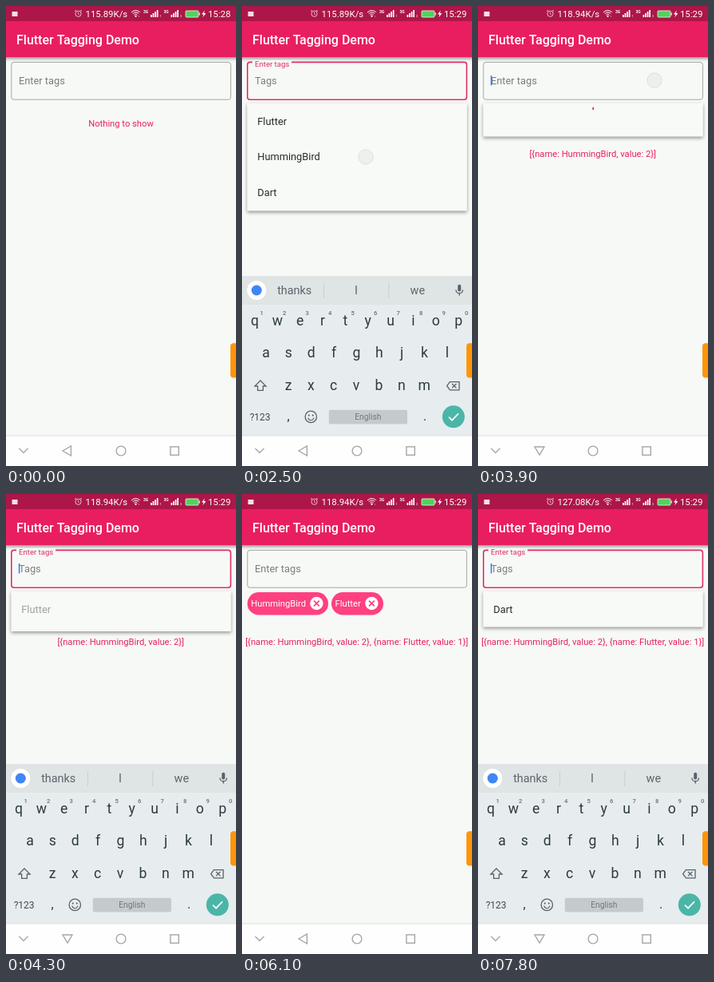
Write an HTML page with a canvas that moves like this. It is 288 by 576 pixels and loops after 8000 ms.

```html
<!DOCTYPE html>
<html lang="en">
<head>
<meta charset="utf-8">
<title>Tagging demo</title>
<style>
html, body { margin: 0; width: 100%; height: 100%; overflow: hidden; background: #f7f9f8; }
canvas { display: block; width: 288px; height: 576px; }
</style>
</head>
<body>
<canvas id="stage"></canvas>
<script>
const W = 288, H = 576, LOOP = 8000;
const PINK = '#e91e60', BG = '#f7f9f7', KEY = '#2b3b41', NAV = '#a6a6a6';
const canvas = document.getElementById('stage');
const dpr = window.devicePixelRatio || 1;
canvas.width = W * dpr;
canvas.height = H * dpr;
const c = canvas.getContext('2d');

// One run: focus the field, load suggestions, pick one.
const runs = [
  { nav: 750, kb: 900, load: 1180, focus: 1080, list: 1680, grow: 120, spin: 220,
    rows: ['Flutter', 'HummingBird', 'Dart'], back: 2450, hide: 2600, pick: 2750 },
  { nav: 3850, kb: 3950, load: 3850, focus: 3910, list: 4280, grow: 330, spin: 400,
    rows: ['Flutter', 'Dart'], back: 4950, hide: 5110, pick: 5180 },
  { nav: 6850, kb: 6950, load: 6850, focus: 6910, list: 7350, grow: 150, spin: 450,
    rows: ['Dart'], back: 1e5, hide: 1e5, pick: 1e5 }
];
const taps = [
  { x: 221, y: 93, from: 500, to: 700 },
  { x: 155, y: 189, from: 2300, to: 2420 },
  { x: 221, y: 93, from: 3700, to: 3820 },
  { x: 193, y: 143.5, from: 4800, to: 5110 },
  { x: 221, y: 93, from: 6700, to: 6820 }
];

const clamp = v => Math.max(0, Math.min(1, v));
const lerp = (a, b, p) => a + (b - a) * p;
const ramp = (t, start, len) => clamp((t - start) / len);
const smooth = p => p * p * (3 - 2 * p);

function text(s, x, y, size, color, align = 'left', weight = 400) {
  c.font = `${weight} ${size}px Roboto, sans-serif`;
  c.textAlign = align;
  c.fillStyle = color;
  c.fillText(s, x, y);
}
function rect(x, y, w, h, color) {
  c.fillStyle = color;
  c.fillRect(x, y, w, h);
}
function round(x, y, w, h, r) {
  c.beginPath();
  c.roundRect(x, y, w, h, r);
}
function disc(x, y, r, color) {
  c.beginPath();
  c.arc(x, y, r, 0, Math.PI * 2);
  c.fillStyle = color;
  c.fill();
}
function ring(x, y, r, color, width) {
  c.beginPath();
  c.arc(x, y, r, 0, Math.PI * 2);
  stroke(color, width);
}
function stroke(color, width) {
  c.strokeStyle = color;
  c.lineWidth = width;
  c.stroke();
}
// Flat list x0, y0, x1, y1, ...
function poly(pts, closed) {
  c.beginPath();
  for (let i = 0; i < pts.length; i += 2) c.lineTo(pts[i], pts[i + 1]);
  if (closed) c.closePath();
}
function line(pts, color, width, closed) {
  poly(pts, closed);
  stroke(color, width);
}
function shape(pts, color) {
  poly(pts, true);
  c.fillStyle = color;
  c.fill();
}
function shadow(color, blur, dy) {
  c.shadowColor = color;
  c.shadowBlur = blur * dpr;
  c.shadowOffsetY = dy * dpr;
}

function signal(x, sub) {
  text('3G', x, 8.5, 5, '#fff', 'left', 700);
  for (let i = 0; i < 4; i++) rect(x + 9 + i * 2.6, 11 - i * 2, 1.7, 3 + i * 2, '#fff');
  text(sub, x + 20.5, 14, 4, '#fff');
}

function statusBar(t) {
  rect(0, 0, W, 19, '#ad1648');
  rect(7.5, 7, 7, 6, '#f8dfe7');
  ring(90.5, 9.7, 3.6, '#f3cfdb', 0.9);
  line([90.5, 7.6, 90.5, 10, 92, 10.7], '#f3cfdb', 0.8);
  line([86, 6.6, 88, 5.2], '#f3cfdb', 0.9);
  line([95, 6.6, 93, 5.2], '#f3cfdb', 0.9);
  const speed = t < 2700 ? '115.89' : t < 6500 ? '118.94' : '127.08';
  text(speed + 'K/s', 99.5, 14, 11.4, '#fff');
  for (const r of [2.6, 5, 7.4]) {
    c.beginPath();
    c.arc(162.5, 13, r, -Math.PI * 0.77, -Math.PI * 0.23);
    stroke('#fff', 1);
  }
  disc(162.5, 12.8, 1.1, '#fff');
  text('↕', 165.5, 14, 4, '#fff');
  signal(172, '1');
  signal(197.5, '2');
  round(225, 6, 16, 8, 1);
  c.fillStyle = '#4fd35b';
  c.fill();
  stroke('#d9efdc', 0.9);
  rect(241.6, 8.4, 1.3, 3.2, '#e8e8e8');
  shape([248.8, 5.5, 245, 10.6, 247.4, 10.6, 246.4, 14.2, 250.4, 9, 247.9, 9], '#fff');
  text(t < 100 ? '15:28' : '15:29', 281.3, 14, 11.4, '#fff', 'right');
}

function appBar() {
  c.save();
  shadow('rgba(0,0,0,.42)', 4, 1.5);
  rect(-5, 19, W + 10, 45, PINK);
  c.restore();
  text('Flutter Tagging Demo', 13, 48, 16, '#fff', 'left', 500);
}

function cursorOn(t, run) {
  if (!run || t < run.load) return false;
  return !(t >= 1700 && t < 2600) && !(t >= 7550 && t < 7750);
}

function field(t, run, p) {
  round(6.8, 70.4, 274.6, 46.8, 3.2);
  stroke(p > 0.3 ? '#dd2f66' : '#9b9d9b', lerp(0.9, 1.6, p));
  if (p > 0) rect(13, 68, 49 * p, 5, BG);
  text('Enter tags', 16, lerp(98, 76, p), lerp(12.8, 9.6, p), p > 0.3 ? '#dd2f66' : '#7b7c7b');
  c.globalAlpha = p;
  text('Tags', 16, 98, 12.8, '#7d7e7d');
  c.globalAlpha = 1;
  if (cursorOn(t, run)) rect(15.8, 87, 1.6, 12.4, '#3e7df0');
}

function chip(x, w, label) {
  round(x, 123, w, 28.4, 14.2);
  c.fillStyle = '#ff4081';
  c.fill();
  text(label, x + 4.6, 141, 11.2, '#fff');
  const cx = x + w - 14.6, cy = 137;
  disc(cx, cy, 8.2, '#fff');
  line([cx - 3.4, cy - 3.4, cx + 3.4, cy + 3.4], '#ff4081', 1.7);
  line([cx - 3.4, cy + 3.4, cx + 3.4, cy - 3.4], '#ff4081', 1.7);
}

function tags(t) {
  const n = t < runs[0].pick ? 0 : t < runs[1].pick ? 1 : 2;
  if (!n) return text('Nothing to show', 144, 150.6, 11.2, PINK, 'center');
  chip(6.7, 101.3, 'HummingBird');
  if (n > 1) chip(112, 65, 'Flutter');
  const more = n > 1 ? ', {name: Flutter, value: 1}' : '';
  text(`[{name: HummingBird, value: 2}${more}]`, 143.7, 189, 11.2, PINK, 'center');
}

function spinner(age) {
  const p = age / 667;
  const start = -Math.PI / 2 + p * 0.9;
  c.beginPath();
  c.arc(144, 142, 13.6, start - 0.06, start + 0.06 + smooth(clamp(p)) * 4.6);
  stroke('#c7305f', 3.2);
}

function dropdown(t, run) {
  if (!run || t < run.load || t >= run.pick) return;
  const ready = t >= run.list;
  const grow = 1 - (1 - ramp(t, run.list, run.grow)) ** 3;
  const h = ready ? lerp(42, run.rows.length * 45, grow) : 42;
  c.save();
  shadow('rgba(0,0,0,.4)', 4, 2);
  round(6.4, 121.4, 275.4, h, 1);
  c.fillStyle = '#f8faf7';
  c.fill();
  c.restore();
  c.save();
  round(6.4, 121.4, 275.4, h, 1);
  c.clip();
  if (ready) {
    if (t >= 4900 && t < 5180) rect(6, 121, 276, 45, '#eff1ee');
    c.globalAlpha = 0.3 + 0.7 * grow;
    run.rows.forEach((s, i) => text(s, 19.3, 148.5 + i * 44.8, 12.8, '#2a2b2a'));
  } else {
    spinner(Math.min(t - run.load - 40, run.spin));
  }
  c.restore();
}

function letters(s, x, y) {
  [...s].forEach((ch, i) => text(ch, x + i * 28.35, y, 17.6, KEY, 'center'));
}

function keyboard() {
  rect(0, 338, W, 200, '#e7edee');
  rect(0, 338, W, 36, '#dfe4e5');
  disc(18.3, 356, 12, '#fff');
  disc(18.3, 356, 6.5, '#4285f4');
  text('thanks', 65.7, 361.3, 14.4, '#5b676c', 'center');
  text('I', 143, 361.3, 14.4, '#5b676c', 'center');
  text('we', 219.8, 361.3, 14.4, '#5b676c', 'center');
  rect(102, 347, 1, 19, '#c9ced0');
  rect(183.3, 347, 1, 19, '#c9ced0');

  round(270.2, 348.8, 4, 8.6, 2);
  c.fillStyle = '#56636a';
  c.fill();
  c.beginPath();
  c.arc(272.2, 355.4, 4.3, 0, Math.PI);
  stroke('#56636a', 1.3);
  line([272.2, 359.5, 272.2, 362.4], '#56636a', 1.4);

  letters('qwertyuiop', 16, 400);
  [...'1234567890'].forEach((d, i) =>
    text(d, 24.6 + i * 28.5, 387.4, 7.6, '#657278', 'center', 500));
  letters('asdfghjkl', 30, 440);
  letters('zxcvbnm', 58, 480.5);

  line([23, 469, 30, 476, 26.4, 476, 26.4, 481.4, 19.6, 481.4, 19.6, 476, 16, 476],
    '#56636a', 1.3, true);
  line([256.6, 475.7, 260.4, 470.6, 272, 470.6, 272, 480.8, 260.4, 480.8],
    '#56636a', 1.3, true);
  line([263, 473, 268.4, 478.4], '#56636a', 1.3);
  line([263, 478.4, 268.4, 473], '#56636a', 1.3);

  text('?123', 22.6, 519, 12, '#3b4a50', 'center');
  text(',', 58, 519, 16, KEY, 'center');
  ring(86.3, 514.4, 7.2, '#56636a', 1.3);
  disc(83.8, 512.6, 1.1, '#56636a');
  disc(88.8, 512.6, 1.1, '#56636a');
  c.beginPath();
  c.arc(86.3, 515, 3.7, 0.2, Math.PI - 0.2);
  stroke('#56636a', 1.2);
  round(108.8, 505.8, 98.2, 17.6, 2);
  c.fillStyle = '#c5cbcd';
  c.fill();
  text('English', 157.8, 518, 10.2, '#6c777b', 'center');
  text('.', 229, 519, 16, KEY, 'center');
  disc(264.8, 514.3, 14, '#4bb5a8');
  line([259, 514.6, 263, 518.6, 271, 510.4], '#fff', 1.8);
}

function keyboardLayer(t, run) {
  if (!run || t < run.kb) return 0;
  const rest = 1 - ramp(t, run.kb, 230);
  const out = ramp(t, run.hide, 180);
  const alpha = (1 - rest ** 4) * (1 - out);
  const dy = 20 * (rest ** 3 + out ** 2);
  if (alpha <= 0) return 0;
  c.save();
  c.translate(0, dy);
  c.globalAlpha = alpha;
  // Flatten overlapping panels before fading.
  keyboard();
  c.restore();
  return dy;
}

function navBar(t, run, dy) {
  const top = 538 + dy;
  rect(0, top, W, H - top, '#fdfefd');
  rect(0, top - 0.5, W, 1, '#dde0df');
  line([16.5, 554, 22, 559.6, 27.5, 554], NAV, 1.4);
  const down = run && t >= run.nav && t < run.back;
  line(down ? [71, 552, 83, 552, 77, 562.2] : [71, 557, 81.4, 551, 81.4, 563], NAV, 1.4, true);
  ring(144, 557, 5.9, NAV, 1.4);
  c.strokeStyle = NAV;
  c.strokeRect(205.9, 551.9, 10.4, 10.4);
}

function touches(t) {
  for (const k of taps) {
    if (t < k.from || t > k.to + 150) continue;
    c.globalAlpha = 1 - ramp(t, k.to, 150);
    disc(k.x, k.y, 9.3, 'rgba(205,208,205,.5)');
    ring(k.x, k.y, 9.2, '#c9cbc9', 1);
    c.globalAlpha = 1;
  }
}

function draw(t) {
  const run = runs.find(r => t >= r.nav && t < r.hide + 300);
  const focus = run
    ? smooth(ramp(t, run.focus, 190)) * (1 - smooth(ramp(t, run.hide, 180)))
    : 0;
  c.setTransform(dpr, 0, 0, dpr, 0, 0);
  rect(0, 0, W, H, BG);
  appBar();
  statusBar(t);
  field(t, t < (run ? run.hide : 0) ? run : null, focus);
  tags(t);
  dropdown(t, run);
  const dy = keyboardLayer(t, run);
  navBar(t, run, dy > 8 ? 0 : dy);
  round(281, 422.3, 12, 43.2, 4);
  c.fillStyle = '#ff9407';
  c.fill();
  touches(t);
}

const begin = performance.now();
function tick() {
  draw((performance.now() - begin) % LOOP);
  requestAnimationFrame(tick);
}
tick();
</script>
</body>
</html>
```
